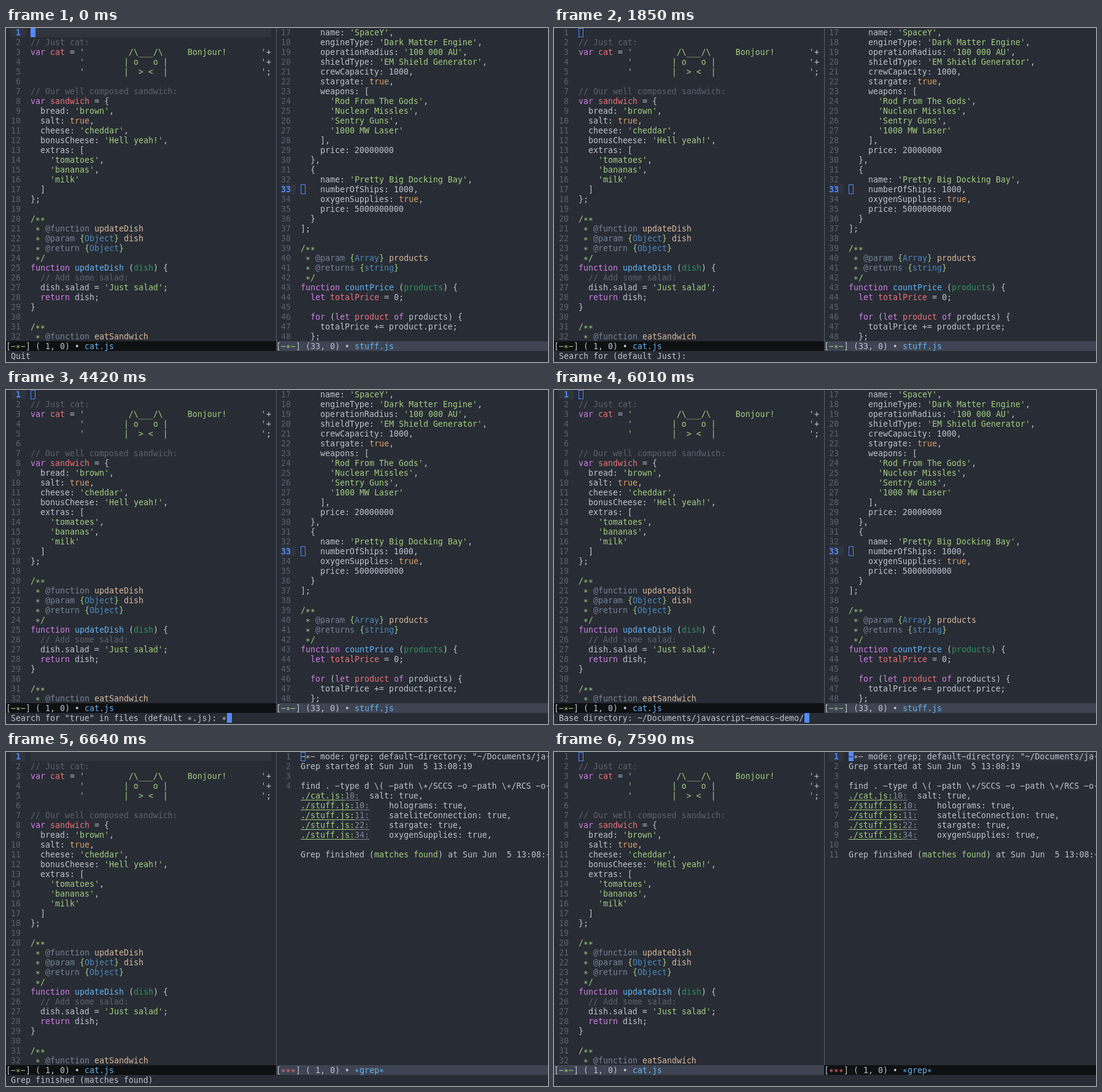
Write an HTML page with a canvas that moves like this. It is 883x545 px and loops after 8 s.

```html
<!DOCTYPE html>
<html lang="en">
<head>
<meta charset="utf-8">
<title>Editor search</title>
<style>
html, body { margin: 0; width: 100%; height: 100%; overflow: hidden; background: #282c34; }
canvas { display: block; }
</style>
</head>
<body>
<canvas id="stage" width="883" height="545"></canvas>
<script>
const ctx = document.getElementById('stage').getContext('2d', { alpha: false });
const LOOP = 8000, CELL = 8, ROW = 16, RIGHT = 440;
const FONT = '13.288px "DejaVu Sans Mono", monospace';
const C = {
  bg: '#282c34', highlight: '#2f343d', active: '#0f1011', inactive: '#3e4451',
  border: '#5c6370', gutter: '#5a6170', text: '#bcc3cf', comment: '#5c6370',
  accent: '#528bff', green: '#a1cd80', purple: '#cf7fe6', red: '#ea717a',
  orange: '#d8a06a', blue: '#64b4f4', param: '#2e9160', tag: '#748496',
  type: '#4a8abe', value: '#d8b99e', number: '#828997'
};

const catFile = String.raw`
// Just cat:
var cat = '         /\___/\     Bonjour!       '+
          '        | o   o |                   '+
          '        |  > <  |                   ';

// Our well composed sandwich:
var sandwich = {
  bread: 'brown',
  salt: true,
  cheese: 'cheddar',
  bonusCheese: 'Hell yeah!',
  extras: [
    'tomatoes',
    'bananas',
    'milk'
  ]
};

/**
 * @function updateDish
 * @param {Object} dish
 * @return {Object}
 */
function updateDish (dish) {
  // Add some salad:
  dish.salad = 'Just salad';
  return dish;
}

/**
 * @function eatSandwich`.split('\n');

const stuffFile = `    name: 'SpaceY',
    engineType: 'Dark Matter Engine',
    operationRadius: '100 000 AU',
    shieldType: 'EM Shield Generator',
    crewCapacity: 1000,
    stargate: true,
    weapons: [
      'Rod From The Gods',
      'Nuclear Missles',
      'Sentry Guns',
      '1000 MW Laser'
    ],
    price: 20000000
  },
  {
    name: 'Pretty Big Docking Bay',
    numberOfShips: 1000,
    oxygenSupplies: true,
    price: 5000000000
  }
];

/**
 * @param {Array} products
 * @returns {string}
 */
function countPrice (products) {
  let totalPrice = 0;

  for (let product of products) {
    totalPrice += product.price;
  };`.split('\n');

const grepOutput = String.raw`-*- mode: grep; default-directory: "~/Documents/ja
Grep started at Sun Jun  5 13:08:19

find . -type d \( -path \*/SCCS -o -path \*/RCS -o
./cat.js:10:  salt: true,
./stuff.js:10:    holograms: true,
./stuff.js:11:    sateliteConnection: true,
./stuff.js:22:    stargate: true,
./stuff.js:34:    oxygenSupplies: true,

Grep finished (matches found) at Sun Jun  5 13:08:`.split('\n');

// Each grammar pairs a pattern with one colour per capture group.
const codeGrammar = [
  /(\/\/.*)|('[^']*')|\b(var|function|return|let|for|of)\b|\b(true)\b|(?<=(?:var|let) )(\w+)|(?<=function )(\w+)|(?<=\()(\w+)(?=\) \{$)/g,
  [C.comment, C.green, C.purple, C.orange, C.red, C.blue, C.param]
];
const docGrammar = [
  /(\/\*\*|\*\/?|[{}])|(@\w+)|(?<=\{)(\w+)|(\w+)/g,
  [C.green, C.tag, C.type, C.value]
];
const grepGrammar = [
  /(^\.\/[\w.]+:)|(?<=^\.\/[\w.]+:)(\d+:)|(matches found)/g,
  [C.green, C.number, C.green]
];
const modeGrammar = [
  /(?<=\[)(-\*-)|(?<=\[)(\*\*\*)|(?<=• )(.+)/g,
  [C.green, C.red, C.blue]
];

const searchPrompt = 'Search for (default Just): ';
const filesPrompt = 'Search for "true" in files (default *.js): ';
const messages = [
  [0, 'Quit'], [1310, searchPrompt],
  [2180, searchPrompt + 't'], [2360, searchPrompt + 'tr'],
  [2480, searchPrompt + 'tru'], [2600, searchPrompt + 'true'],
  [3080, filesPrompt], [4420, filesPrompt + '*'],
  [4900, 'Base directory: ~/Documents/javascript-emacs-demo/'],
  [6130, ''], [6340, 'Grep finished (matches found)'], [7360, '']
];
const cursorHidden = [[300, 840], [1850, 2180], [3730, 4180], [5500, 6010], [6640, 7180]];

function rect(x, y, w, h, color) {
  ctx.fillStyle = color;
  ctx.fillRect(x, y, w, h);
}

// Hyphens and asterisks sit at the height of the maths operators.
function write(text, x, row, color, bold = false) {
  ctx.font = (bold ? 'bold ' : '') + FONT;
  ctx.fillStyle = color;
  ctx.fillText(text.replace(/-/g, '\u2212').replace(/\*/g, '\u2217'), x, 12 + row * ROW);
}

function writeColored(line, x, row, [pattern, colors]) {
  let end = 0;
  const put = (text, at, color) => text.trim() && write(text, x + at * CELL, row, color);
  for (const match of line.matchAll(pattern)) {
    put(line.slice(end, match.index), end, C.text);
    put(match[0], match.index, colors[match.slice(1).findIndex(group => group !== undefined)]);
    end = match.index + match[0].length;
  }
  put(line.slice(end), end, C.text);
}

function lineNumber(n, x, row, current) {
  if (current) rect(x + 8, row * ROW - 1, 24, ROW, C.highlight);
  write(String(n).padStart(2), x + 8, row, current ? C.accent : C.gutter, current);
}

function drawCode(lines, x, first, current) {
  lines.forEach((line, row) => {
    lineNumber(first + row, x, row, first + row === current);
    writeColored(line, x + 40, row, /^(\/\*\*| \*)/.test(line) ? docGrammar : codeGrammar);
  });
}

function drawGrep(done, selected) {
  grepOutput.slice(0, done ? 11 : 4).forEach((line, row) => {
    if (selected || row < 4) lineNumber(row + 1, RIGHT, row, selected && row === 0);
    writeColored(line, RIGHT + 40, row, grepGrammar);
    const link = line.match(/^(\.\/[\w.]+:)(\d+:)/);
    if (link) {
      const y = 14 + row * ROW, split = link[1].length * CELL;
      rect(480, y, split, 1, C.green);
      rect(480 + split, y, link[2].length * CELL, 1, C.number);
    }
    if (line.length === 50) rect(881, row * ROW + 7, 2, 1, C.text);
  });
}

function modeLine(text, x, width, active) {
  rect(x, 511, width, ROW, active ? C.active : C.inactive);
  writeColored(text, x, 32, modeGrammar);
}

function hollowCursor(x, row) {
  const top = Math.max(0, row * ROW - 1);
  ctx.strokeStyle = C.accent;
  ctx.lineWidth = 1;
  ctx.strokeRect(x + 0.5, top + 0.5, CELL - 1, row * ROW + 14 - top);
}

function solidCursor(x, row) {
  rect(x, row * ROW - 1, CELL, ROW, C.accent);
}

function draw(t) {
  const prompting = t >= 1310 && t < 6130;
  const grepping = t >= 6130;
  const rightSelected = t >= 7590;
  const leftSelected = !prompting && !rightSelected;
  const cursorOn = !cursorHidden.some(([from, to]) => t >= from && t < to);
  const message = messages.findLast(([start]) => t >= start)[1];

  rect(0, 0, 883, 545, C.bg);
  if (leftSelected) rect(40, 0, 392, 15, C.highlight);
  if (rightSelected) rect(480, 0, 400, 15, C.highlight);

  const leftNumberDim = (t >= 1310 && t < 3190) || rightSelected;
  drawCode(catFile, 0, 1, leftNumberDim ? 0 : 1);
  if (!leftSelected) hollowCursor(40, 0);
  else if (cursorOn) solidCursor(40, 0);

  if (grepping) drawGrep(t >= 6340, rightSelected);
  else drawCode(stuffFile, RIGHT, 17, 33);
  if (rightSelected) {
    solidCursor(480, 0);
    write('-', 480, 0, C.bg);
  } else hollowCursor(480, grepping ? 0 : 16);

  rect(RIGHT, 0, 1, 511, C.border);
  modeLine('[-*-] ( 1, 0) • cat.js', 0, RIGHT, !rightSelected);
  modeLine(grepping ? '[***] ( 1, 0) • *grep*' : '[-*-] (33, 0) • stuff.js', RIGHT, 443, rightSelected);

  write(message, 8, 33, C.text);
  if (prompting && cursorOn) solidCursor(8 + message.length * CELL, 33);
}

function tick() {
  draw(performance.now() % LOOP);
  requestAnimationFrame(tick);
}
tick();
</script>
</body>
</html>
```
